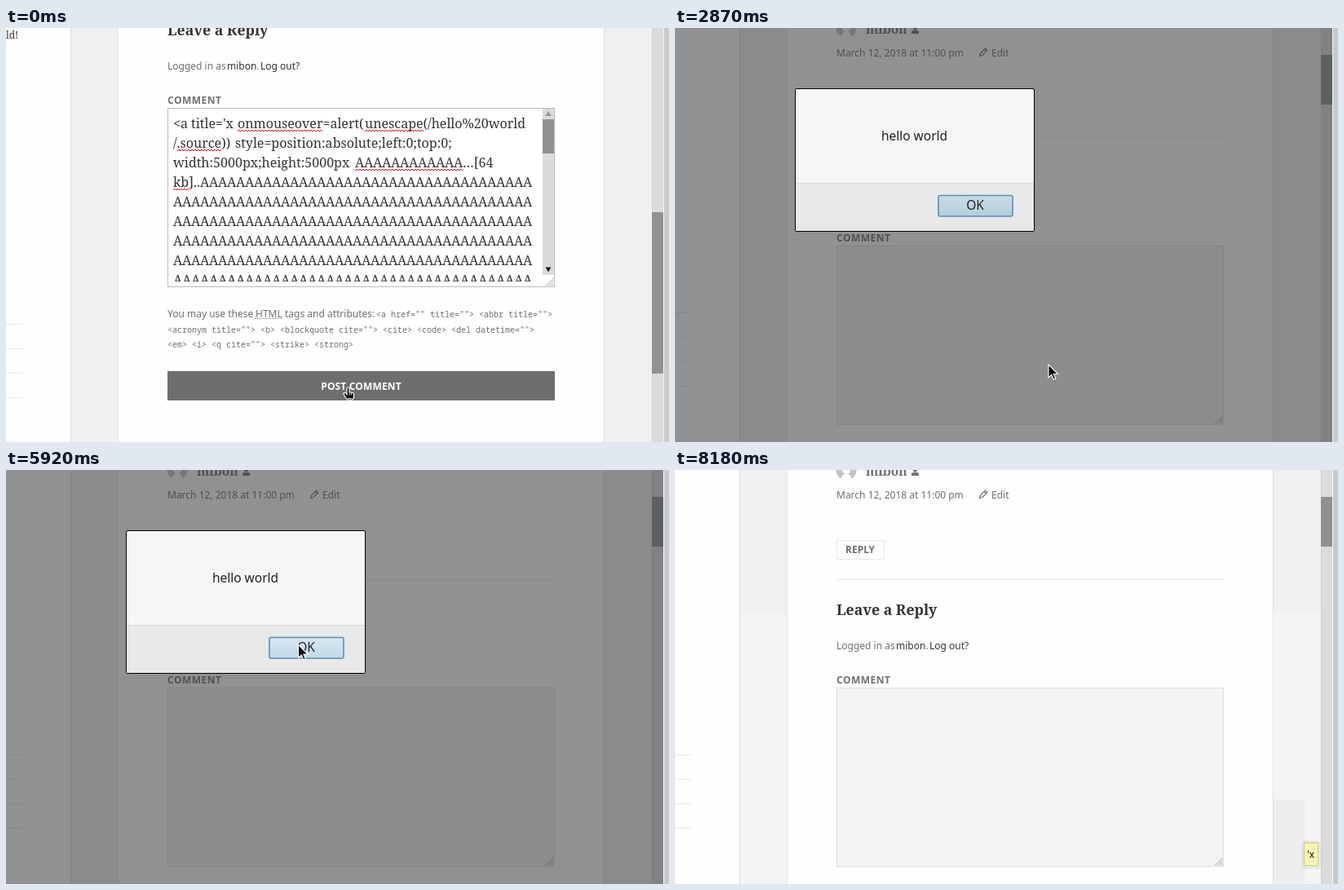
These frames come from a looping animation (813x508 px, 8.3 s). An HTML page:

```html
<!DOCTYPE html>
<html lang="en">
<head>
<meta charset="utf-8">
<title>Comment form</title>
<style>
  html, body { margin: 0; width: 100%; height: 100%; overflow: hidden; background: #fdfdfd; }
  svg { display: block; width: 100%; height: 100%; }
  text { font-family: "Noto Sans", sans-serif; font-size: 12px; fill: #707070; white-space: pre; }
  .serif { font-family: "Noto Serif", serif; }
  .bold { font-weight: 700; }
  .mono { font-family: "Noto Sans Mono", monospace; font-size: 10px; }
  .dark { fill: #333; }
  .ui { font-size: 15.5px; fill: #222; }
  .label { font-weight: 700; letter-spacing: .04em; }
  .body text { font-family: "Noto Serif", serif; font-size: 16px; fill: inherit; }
  .wave { fill: none; stroke: #e02020; stroke-width: 1; }
</style>
</head>
<body>
<svg id="stage" viewBox="0 0 813 508" preserveAspectRatio="none"></svg>
<script>
const LOOP = 8300;
const SENT = 870, ARROW = 1610, ALERT = 1770, OVER = 5800, CLOSING = 6570, CLOSED = 6720, PATCH = 7440, TIP = 8180;

// pointer stops: time, x, y
const stops = [
  [0, 417.5, 440], [2570, 418.5, 440], [2720, 440, 421], [2870, 458, 413], [2990, 484, 421],
  [3240, 634, 415], [3390, 690, 436], [3510, 745, 477], [3630, 776.5, 504],
  [5530, 485, 350], [5680, 408, 272], [5800, 350, 212], [5920, 358.5, 214.5],
  [6870, 398, 218], [6990, 454, 223], [7140, 660, 332], [7290, 730, 406],
  [7440, 761, 488], [7600, 771.5, 506.5]
];

const rect = (x, y, w, h, fill, extra = '') =>
  `<rect x="${x}" y="${y}" width="${w}" height="${h}" fill="${fill}" ${extra}/>`;
const frame = (x, y, w, h, fill, line, extra = '') =>
  rect(x + .5, y + .5, w - 1, h - 1, fill, `stroke="${line}" ${extra}`);
const text = (x, y, s, cls = '', extra = '') =>
  `<text x="${x}" y="${y}" class="${cls}" ${extra}>${s.replace(/<(?!\/?tspan)/g, '&lt;')}</text>`;
const group = (id, body, extra = '') => `<g id="${id}" ${extra}>${body}</g>`;

function wave(x1, x2, y) {
  let d = `M${x1} ${y + 1}`;
  for (let x = x1 + 2, up = true; x <= x2; x += 2, up = !up) d += `L${x} ${up ? y - 1 : y + 1}`;
  return `<path class="wave" d="${d}"/>`;
}

// letters on a fixed 11px advance
function run(x, y, n) {
  const xs = Array.from({ length: n }, (_, i) => x + i * 11).join(' ');
  return text(xs, y, 'A'.repeat(n));
}

function grip(x, y) {
  let s = '';
  for (let r = 0; r < 5; r++)
    for (let c = 0; c <= r; c++) s += rect(x - c * 2, y - (4 - r) * 2, 1, 1, '#8a8a8a');
  return s;
}

function shell(thumbY, thumbH, ruleY) {
  let s = rect(0, 0, 813, 508, '#fefefe') + rect(79, 0, 59, 508, '#f0f0f0') + rect(733, 0, 59, 508, '#f0f0f0');
  for (const x of [79, 137, 733]) s += rect(x, 0, 1, 508, x === 137 ? '#e6e6e6' : '#dcdcdc');
  for (let i = 0; i < 4; i++) s += rect(0, ruleY + i * 30, 20, 1, '#e8e8e8');
  return s + rect(792, 0, 14, 508, '#dbdbdb') + rect(792, 0, 1, 508, '#d0d0d0') +
    rect(792, thumbY, 14, thumbH, '#919191');
}

const replyHead = y =>
  text(198, y + 9, 'Leave a Reply', 'serif bold dark', 'style="font-size:17.7px"') +
  text(198, y + 51, 'Logged in as') +
  text(271, y + 51, '<tspan class="dark">mibon</tspan>.') +
  text(312, y + 51, 'Log out?', 'dark') +
  text(198, y + 93, 'COMMENT', 'label');

function commentText() {
  let s = text(205, 123, "<a title='x") +
    text(284, 123, 'onmouseover=alert(') + text(440, 123, 'unescape(/hello%20world') +
    text(205, 147, '/.source))') + text(281, 147, 'style=position:absolute;left:0;top:0;') +
    text(205, 171, 'width:5000px;height:5000px') + run(428, 171, 12) + text(560, 171, '…[64') +
    text(205, 195, 'kb]..') + run(238, 195, 37);
  for (let i = 0; i < 5; i++) s += run(205, 219 + i * 24, 40);
  return s;
}

function lateWaves() {
  let s = wave(238, 645, 198);
  for (let i = 0; i < 4; i++) s += wave(205, 645, 222 + i * 24);
  return s;
}

const formPage = shell(226, 198, 363) +
  text(0, 13, 'ld!', 'serif dark') + replyHead(0) +
  frame(198, 98, 475, 220, '#fff', '#c0c0c0', 'id="box"') +
  group('body', commentText(), 'class="body" clip-path="url(#area)"') +
  wave(284, 388, 126) + wave(440, 512, 126) + wave(210, 265, 150) + wave(428, 560, 174) + wave(205, 225, 198) +
  group('late', lateWaves()) +
  rect(658, 99, 14, 204, '#dbdbdb') + rect(658, 112, 14, 42, '#919191') +
  '<path d="M661 108h8l-4-6z" fill="#999"/><path d="M661.5 293.500h7l-3.500 6z" fill="#222"/>' +
  grip(670, 315) +
  text(198, 355, 'You may use these') + text(306, 355, 'HTML') + text(342, 355, 'tags and attributes:') +
  '<path d="M306 356.500h33" stroke="#707070" stroke-dasharray="1 1"/>' +
  text(454, 355, '<a href="" title=""> <abbr title="">', 'mono') +
  text(198, 374, '<acronym title=""> <b> <blockquote cite=""> <cite> <code> <del datetime="">', 'mono') +
  text(198, 392, '<em> <i> <q cite=""> <strike> <strong>', 'mono') +
  rect(198, 421, 475, 36, '#6e6e6e') +
  text(435.5, 444, 'POST COMMENT', 'bold', 'text-anchor="middle" style="fill:#fff;letter-spacing:.15px"');

const resultPage = shell(33, 61, 349) +
  group('tint', rect(80, 175, 57, 333, '#f4f4f4') + rect(734, 175, 58, 333, '#f5f5f5')) +
  group('patch', rect(734, 404, 40, 104, '#eee')) +
  '<circle cx="210" cy="0" r="12.500" fill="#c3c3c3"/><path d="M203 12.500q1-8 7-8t7 8z" fill="#fefefe"/><circle cx="210" cy="0" r="5" fill="#fefefe"/>' +
  text(234, 7, 'mibon', 'serif bold', 'style="font-size:15.5px"') +
  '<circle cx="294.500" cy="0" r="2.500" fill="#707070"/><path d="M290 7v-2q0-2 2-2h5q2 0 2 2v2z" fill="#707070"/>' +
  text(198, 35, 'March 12, 2018 at 11:00 pm') +
  '<path d="M373.500 34.500l1-3.500 6-6 2.500 2.500-6 6zM379 26.500l2.500 2.500" fill="none" stroke="#707070" stroke-width="1.200"/>' +
  text(388, 35, 'Edit') +
  frame(198, 86, 59, 24, '#fefefe', '#e8e8e8') + text(209, 102, 'REPLY', 'bold') +
  rect(198, 134, 475, 1, '#e8e8e8') + replyHead(169) +
  frame(198, 267, 475, 220, '#f4f4f4', '#dfdfdf') + grip(670, 484);

const alertBox = rect(0, 0, 806, 508, '#343638', 'fill-opacity=".54"') +
  frame(147, 74, 294, 176, '#f6f6f6', '#000', 'rx="1.500"') +
  rect(148, 190, 292, 59, '#e8e8e8') + rect(148, 190, 292, 1, '#d8d8d8') +
  text(293.5, 138, 'hello world', 'ui', 'text-anchor="middle"') +
  rect(323, 205.5, 91, 25.5, 'url(#idle)', 'id="ok" rx="2" stroke="#5590b2" stroke-width="1.600"') +
  text(368, 223, 'OK', 'ui', 'text-anchor="middle"');

const gradient = (id, a, b) =>
  `<linearGradient id="${id}" x2="0" y2="1"><stop stop-color="${a}"/><stop offset="1" stop-color="${b}"/></linearGradient>`;

const stage = document.getElementById('stage');
stage.innerHTML = '<defs>' + gradient('idle', '#c9dce7', '#b3cfdc') + gradient('hover', '#d8e7f0', '#c0dae8') +
  gradient('down', '#a5b8c3', '#93adbb') +
  `<clipPath id="area">${rect(199, 99, 459, 212, '#000')}</clipPath>` +
  `<clipPath id="rest">${rect(0, 175, 813, 333, '#000')}</clipPath></defs>` +
  group('form', formPage) + group('result', resultPage) + group('alert', alertBox) +
  rect(806, 0, 1, 508, '#f8f8f8') + rect(807, 0, 6, 508, '#c9c9c9') +
  group('tip', rect(768, 455, 24, 35, '#000', 'rx="3" fill-opacity=".05"') +
    frame(771, 457, 18, 29, '#f5f5b5', '#cfcf72') + text(775, 476, "'x", '', 'style="fill:#111"')) +
  group('hand', '<path d="M418 450v-7.500q0-1.500 1.500-1.500t1.500 1.500v4.500q5 0 5.500 2v4l-1.500 3h-6.500l-3.500-5-1-3q1-1.500 2.500 0z" fill="#000" stroke="#fff" stroke-width="1.200"/>' +
    '<path d="M421.500 448v2.500M423.500 448v2.500M419 454.500h5" stroke="#fff" stroke-width=".8"/>') +
  group('arrow', '<path d="M0 0V16L3.800 12.500 6.300 18.300 8.800 17.200 6.300 11.500H11.500Z" fill="#000" stroke="#fff" stroke-width="1.100"/>');

const $ = id => document.getElementById(id);
const show = (id, on) => $(id).setAttribute('display', on ? 'inline' : 'none');

function draw(t) {
  const sent = t >= SENT;
  show('form', t < ALERT);
  show('result', t >= ALERT);
  show('late', sent);
  $('box').setAttribute('fill', sent ? '#f6f6f6' : '#fff');
  $('box').setAttribute('stroke', sent ? '#dedede' : '#bbb');
  $('body').setAttribute('fill', sent ? '#6c6c6c' : '#333');

  show('alert', t >= ALERT && t < CLOSED);
  $('alert').setAttribute('clip-path', t >= CLOSING ? 'url(#rest)' : 'none');
  $('ok').setAttribute('fill', `url(#${t >= CLOSING ? 'down' : t >= OVER ? 'hover' : 'idle'})`);
  show('tint', t >= CLOSED);
  show('patch', t >= PATCH);
  show('tip', t >= TIP);

  show('hand', t < ARROW);
  show('arrow', t >= ARROW);
  const [, x, y] = stops.filter(s => s[0] <= t).pop();
  $('arrow').setAttribute('transform', `translate(${x} ${y})`);
}

const start = performance.now();
function tick(now) {
  draw(Math.max(0, now - start) % LOOP);
  requestAnimationFrame(tick);
}
draw(0);
requestAnimationFrame(tick);
</script>
</body>
</html>
```
